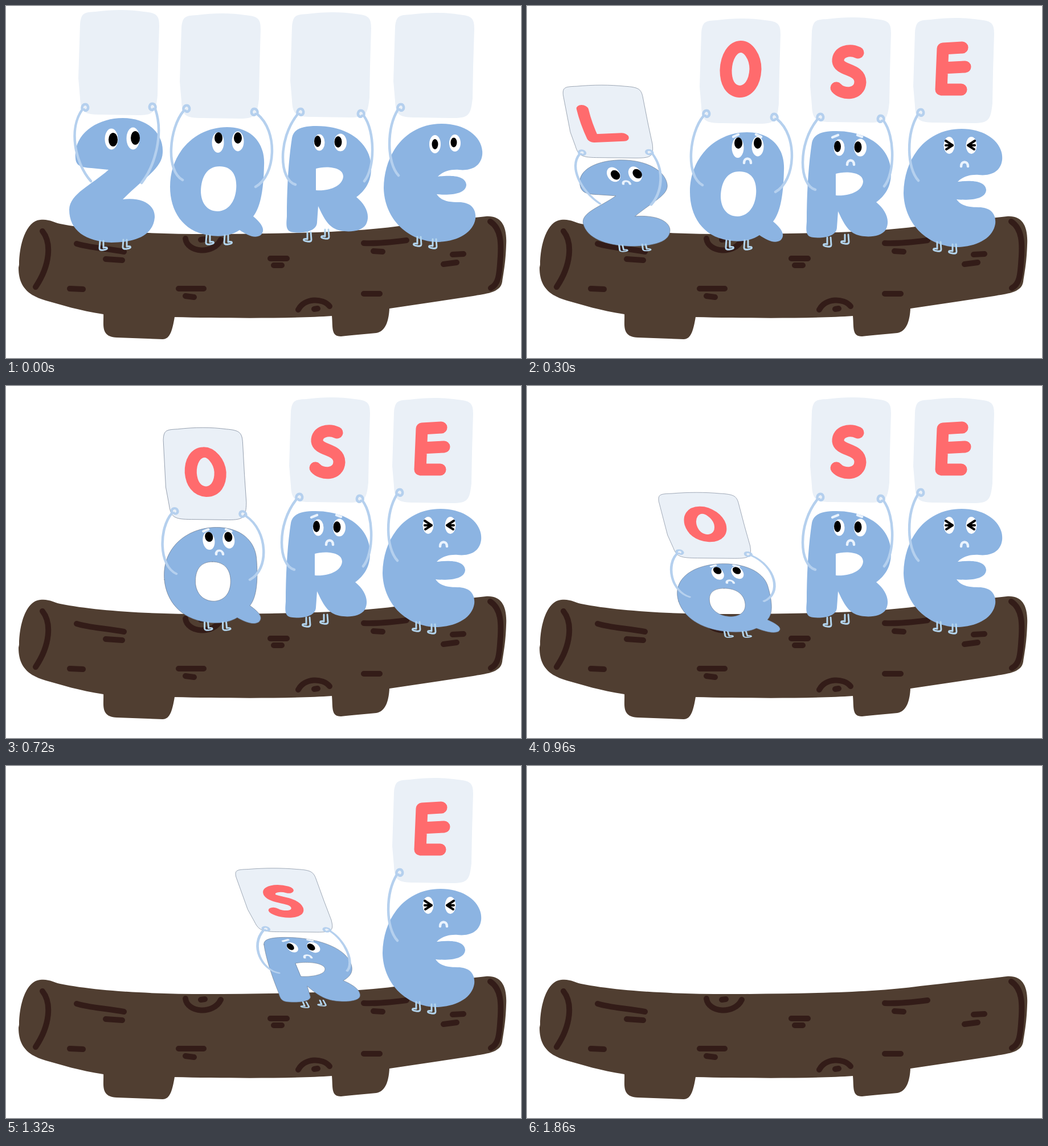
Animation of 904x619 px, one loop 1.92 s. Source, as an HTML page:

```html
<!DOCTYPE html>
<html lang="en">
<head>
<meta charset="utf-8">
<title>Letters on a log</title>
<style>
  html, body { margin: 0; width: 100%; height: 100%; overflow: hidden; background: #fff; }
  svg { display: block; width: 904px; height: 619px; }
  path, ellipse { stroke-linecap: round; stroke-linejoin: round; }
  .log { fill: #503e31; }
  .bark { fill: none; stroke: #331c18; stroke-width: 10; }
  .card { fill: #eaf0f7; }
  .body { fill: #8cb4e2; fill-rule: evenodd; }
  .fall .card, .fall .body { stroke: #68768a; stroke-width: .7; }
  .sign { fill: none; stroke: #ff6b6d; stroke-width: 21; }
  .arm { fill: none; stroke: #b5d0ee; stroke-width: 4.5; }
  .foot { fill: none; stroke: #b3d5ee; stroke-width: 3; }
  .white { fill: #fff; }
  .mood { fill: none; stroke: #eaf3fd; stroke-width: 4.5; }
  .squint { fill: none; stroke: #000; stroke-width: 4; }
  .sad, .down .calm { display: none; }
  .down .sad { display: inline; }
</style>
</head>
<body>
<svg viewBox="0 0 904 619">
  <path class="log" d="M23 455C23 420 35 378 60 376C75 374 85 381 95 383C160 396 260 402 380 401
    C500 400 610 398 690 387C740 381 800 375 842 370C868 368 880 385 878 420C877 450 874 465 871 485
    C868 505 840 506 820 510L673 532C672 550 668 572 650 575C630 577 605 579 588 581
    C570 581 574 565 572 545C500 550 380 549 296 547C292 570 288 586 275 586L195 583
    C165 582 172 560 171 542C130 536 95 525 70 518C35 508 22 490 22 460Z"/>
  <path class="bark" d="M64 396C80 416 78 455 52 494M124 418C145 425 175 426 207 432M175 445L204 447
    M112 497L135 498M315 409C318 434 364 438 377 411M342 411L349 410M303 497H347M315 510L330 512
    M464 444H493M470 456H484M513 534C524 513 556 513 568 528M541 533L547 532M628 506H656
    M628 417C650 418 680 415 703 412M645 431L661 432M784 437L803 436M768 454L791 451
    M850 379C870 392 869 420 868 440C866 465 867 488 851 496"/>
  <g id="cast"></g>
</svg>
<script>
const LOOP = 1920, STEP = 60, GROUND = 430;

// eyes: [x, y, rx, ry, pupil x, pupil y, pupil rx, pupil ry]
// feet: [x, y, direction]; keys: [time, lean, height, drop]
const cast = [
  {
    card: [127, 7],
    sign: 'M158 68Q158 105 164 142L217 139',
    body: 'M122 268C118 225 160 197 205 197C250 197 277 225 275 258C274 285 245 300 205 340' +
      'C240 336 262 350 261 372C258 405 225 416 185 416C140 414 111 395 111 358' +
      'C112 330 150 315 180 288L150 285C130 284 123 280 122 268Z',
    arms: [['M149 308C120 275 110 215 134 182', 1], ['M238 311C262 280 277 225 262 181', -1]],
    feet: [[165, 413, 1], [206, 411, 1]],
    eyes: [[185, 234, 11.5, 18.5, 188, 235, 8, 12], [223, 233, 11.5, 19.5, 227, 232, 8, 12]],
    mouth: [204, 254],
    keys: [[60, 0, 1, 0], [300, .166, .693, -4], [360, .166, .693, -4], [540, .217, .62, 0]],
    gone: 600
  },
  {
    card: [305, 13],
    sign: 'M377 62.5C390 62 403 80 403 102C402 126 391 141 375 141.5C359 140 351 126 351 104C352 80 363 63 377 62.5Z',
    body: 'M288 318C288 255 335 213 388 213C430 213 455 240 453 280C452 330 445 356 434 370' +
      'C452 385 455 395 447 403C436 410 422 402 410 394C395 404 375 407 355 403C310 396 288 360 288 318Z' +
      'M375 282C398 282 406 300 404 322C402 345 390 360 372 361C352 361 342 345 342 325C343 300 353 282 375 282Z',
    arms: [['M310 306C280 290 286 215 312 184', 1], ['M438 318C474 298 478 220 441 190', -1]],
    feet: [[352, 403, 1], [384, 403, 1]],
    eyes: [[372, 240, 10.5, 18, 373, 232, 7, 10], [407, 238, 10.5, 17.5, 407, 232, 7, 10]],
    mouth: [389, 263],
    brows: 'M364 221L373 217M404 217L413 221',
    keys: [[540, 0, 1, 0], [720, .078, .877, 1], [960, .195, .627, 13], [1020, .21, .61, 14]],
    gone: 1080
  },
  {
    card: [499, 11],
    sign: 'M583 73C568 66 547 71 548 88C550 106 587 100 587 125C586 148 556 148 545 135',
    body: 'M502 232C505 215 522 211 545 211C600 211 641 240 641 285C641 310 630 325 615 336' +
      'C632 350 640 368 632 384C622 400 590 398 578 392C562 384 556 368 548 352L546 380' +
      'C546 397 520 400 505 398C490 397 492 385 493 370C493 320 496 270 502 232Z' +
      'M544 286C560 281 592 282 592 300C590 320 560 326 544 324Z',
    arms: [['M508 314C480 306 476 235 512 190', 1], ['M629 308C648 285 648 220 628 193', -1]],
    feet: [[535, 398, -1], [566, 393, -1]],
    eyes: [[550, 240, 9.5, 14.5, 547, 238, 6, 10], [587, 240, 11, 15.5, 583, 239, 6.5, 10]],
    mouth: [570, 266],
    brows: 'M538 222L548 218M582 218L590 221',
    keys: [[1020, 0, 1, 0], [1320, .25, .608, -1], [1500, .28, .57, 1]],
    gone: 1560
  },
  {
    card: [680, 12],
    sign: 'M766 64L732 66L729 138H764M731 100L771 98',
    body: 'M663 320C664 255 705 207 765 207C808 207 839 232 836 262C833 285 812 290 795 288' +
      'C778 287 766 292 758 300C775 298 806 296 808 314C808 332 776 333 756 331' +
      'C764 343 778 345 795 345C815 345 826 356 824 374C820 400 790 415 755 415C700 412 664 370 663 320Z',
    arms: [['M689 298C668 275 668 215 688 182', 1]],
    feet: [[728, 406, -1], [755, 410, -1]],
    eyes: [[753, 243, 10, 16, 753, 243, 5.5, 9], [788, 241, 10, 15, 786, 240, 5.5, 8.5]],
    squint: [[743, 236, 1], [782, 236, -1]],
    mouth: [770, 269],
    keys: [[1500, 0, 1, 0], [1620, .21, .76, 2], [1800, .27, .6, 4]],
    gone: 1860
  }
];

const path = (cls, d, at) =>
  `<path class="${cls}" d="${d}"${at ? ` transform="translate(${at[0]} ${at[1]}) scale(${at[2] || 1} 1)"` : ''}/>`;
const oval = (x, y, rx, ry, cls = '') =>
  `<ellipse class="${cls}" cx="${x}" cy="${y}" rx="${rx}" ry="${ry}"/>`;
const hand = d => `c${-3 * d} -9 ${8 * d} -13 ${10 * d} -5c${d} 6 ${-5 * d} 9 ${-7 * d} 5`;

const CARD = 'M3 25C5 5 10 4 30 3C60 -1 90 -1 115 3C138 5 142 10 142 28L140 95L139 150' +
  'C136 180 132 185 105 185L40 184C10 184 4 180 3 155L0 120Z';
const FOOT = 'M0 0L-1 13q0 4 7 3q8 -1 6 -4q-3 -1 -6 0L6 0';

function draw(c) {
  const eyes = c.eyes.map(e => oval(...e.slice(0, 4), 'white') + oval(...e.slice(4))).join('');
  const squint = (c.squint || []).map(e =>
    oval(e[0], e[1], 9.5, 15, 'white') + path('squint', 'M-6 -8L6 0L-5 7M-6 0H6', e)).join('');
  return path('card', CARD, c.card) +
    path('sign sad', c.sign) +
    path('body', c.body) +
    c.arms.map(([d, side]) => path('arm', d + hand(side))).join('') +
    c.feet.map(f => path('foot', FOOT, f)).join('') +
    (squint ? `<g class="calm">${eyes}</g><g class="sad">${squint}</g>` : eyes) +
    path('mood sad', 'M-6 4C-6 -6 6 -6 6 4', c.mouth) +
    (c.brows ? path('mood sad', c.brows) : '');
}

function pose(keys, t) {
  if (t <= keys[0][0]) return keys[0].slice(1);
  const i = keys.findIndex(k => k[0] >= t);
  if (i < 0) return keys[keys.length - 1].slice(1);
  const a = keys[i - 1], b = keys[i], p = (t - a[0]) / (b[0] - a[0]);
  return a.slice(1).map((v, j) => v + (b[j + 1] - v) * p);
}

const stage = document.getElementById('cast');
stage.innerHTML = cast.map(c => `<g>${draw(c)}</g>`).join('');

const start = performance.now();
function frame() {
  const now = Math.max(0, performance.now() - start) % LOOP;
  const t = Math.floor(now / STEP) * STEP;
  stage.setAttribute('class', t ? 'down' : '');
  cast.forEach((c, i) => {
    const g = stage.children[i];
    const [lean, tall, drop] = pose(c.keys, t);
    g.style.display = t < c.gone ? '' : 'none';
    g.setAttribute('class', lean ? 'fall' : '');
    // squash and lean about the ground line, after the small slump
    const slump = t ? 'translate(-2 9)' : '';
    g.setAttribute('transform',
      `matrix(1 0 ${lean} ${tall} ${-lean * GROUND} ${GROUND * (1 - tall) + drop}) ${slump}`);
  });
  requestAnimationFrame(frame);
}
frame();
</script>
</body>
</html>
```
